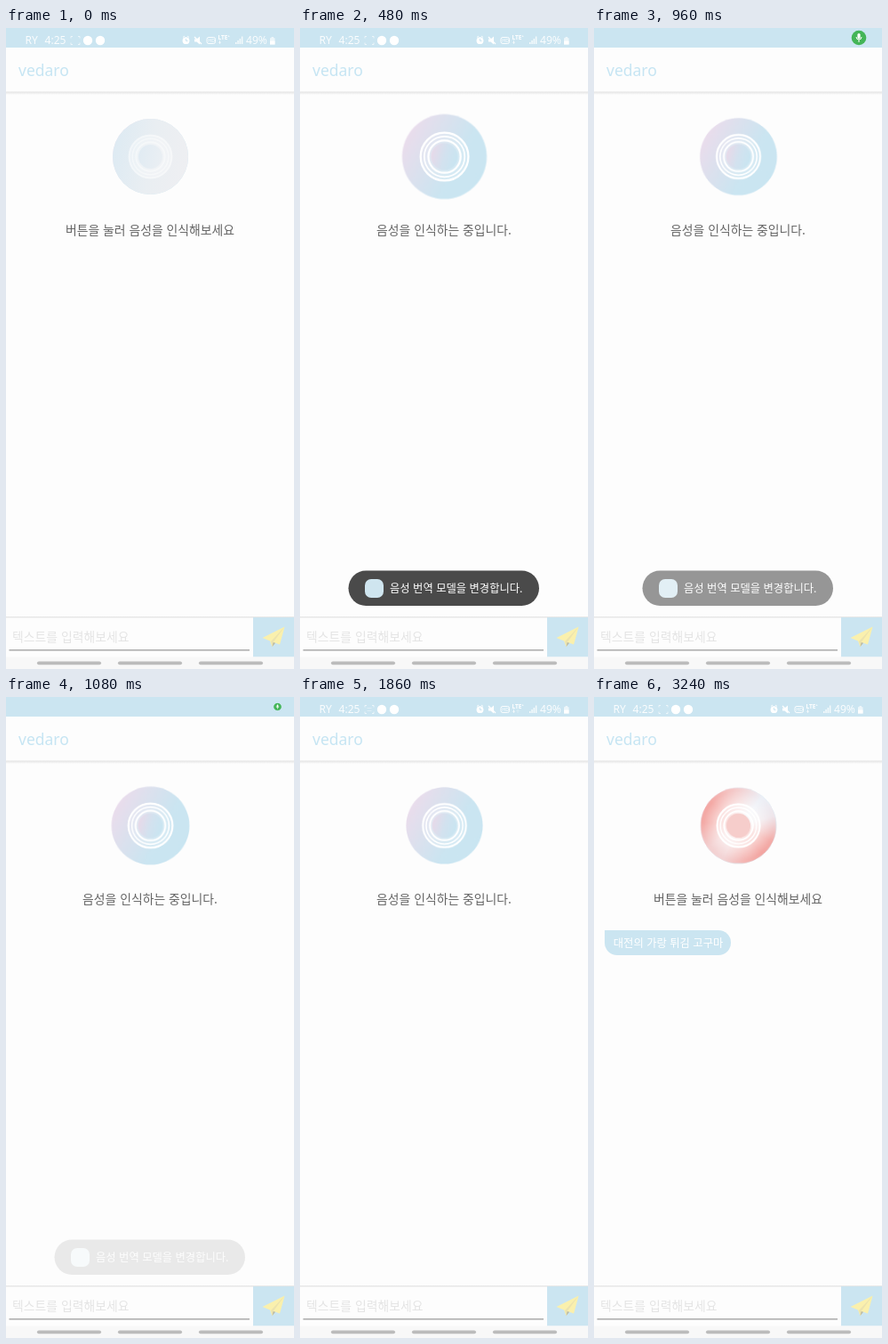
Recreate the animation shown at these times as an HTML page. Size 324x720 px, loop 3270 ms.

```html
<!DOCTYPE html>
<html lang="ko">
<head>
<meta charset="utf-8">
<title>Voice recognition</title>
<style>
  html, body { margin: 0; width: 100%; height: 100%; overflow: hidden; background: #fdfdfd; }
  body { position: relative; }
  svg { position: absolute; left: 0; top: 0; display: block; }
  text { font-family: "Noto Sans CJK KR", "Noto Sans CJK", "Noto Sans", sans-serif; }
  .latin { font-family: "Noto Sans", "Open Sans", sans-serif; }
  .prompt { font-size: 13.87px; fill: #646464; text-anchor: middle; }

  /* One shared 3270 ms clock */
  .anim, .disc, .disc .face { animation: 3270ms linear infinite; }

  .disc { position: absolute; left: 119.5px; top: 101.5px; width: 85px; height: 85px; animation-name: pulse; }
  .face { position: absolute; inset: 0; border-radius: 50%; filter: blur(.7px); }
  .face::before, .face::after { content: ""; position: absolute; border-radius: 50%; }
  .face::before { inset: 18px; background: rgba(255, 255, 255, var(--veil)); }
  .face::after { inset: 29px; background: var(--core); }
  .blue { background: linear-gradient(118deg, #eddcec 8%, #dbe1ee 36%, #cbe5f1 62%, #c9e6f2);
          --veil: .2; --core: linear-gradient(105deg, #ecd8e8, #d3e2ef 50%, #c6e6f2); }
  .pale { background: linear-gradient(100deg, #dceaf3, #e9eef2 50%, #efeff2);
          --veil: .3; --core: linear-gradient(100deg, #e0ebf3, #ebeff3); }
  .red  { background: radial-gradient(rgba(255, 255, 255, .5) 40%, transparent 66%),
            conic-gradient(#f4cfcf, #edf0f7 40deg, #efe6eb 75deg, #f3aca8 115deg, #f3a5a1 140deg,
            #f4b5b2 170deg, #f3d5d6 205deg, #f3d0d0 235deg, #f3aaa6 275deg, #f4a9a5 310deg, #f4cfcf);
          --veil: .35; --core: #f6cdcb; }
  .disc .blue { animation: none; }
  .disc .pale { animation-name: pale; animation-timing-function: step-end; }
  .disc .red { animation-name: red; }
  .disc svg { fill: none; stroke: #fff; }
  .rings { animation-name: rings; }

  .idle { animation-name: idle; animation-timing-function: step-end; }
  .busy { animation-name: busy; animation-timing-function: step-end; }
  .bubble { animation-name: bubble; animation-timing-function: step-end; }
  .toast { animation-name: toast; }
  .status { animation-name: status; }
  .chip { animation-name: chip; transform-box: view-box; transform-origin: 0 0; }
  .blink { animation-name: blink; }

  @keyframes pulse {
    0% { transform: scale(1); }
    6.4%, 10.1% { transform: scale(1.01); }
    13.8%, 15.6% { transform: scale(1.12); }
    18.3% { transform: scale(1.08); }
    22% { transform: scale(1.02); }
    25.7% { transform: scale(1.06); }
    29.4% { transform: scale(1.02); }
    33.9% { transform: scale(1.035); }
    39.4% { transform: scale(1.02); }
    45.9%, 54.1% { transform: scale(1.035); }
    58.7%, 100% { transform: scale(1); }
  }
  @keyframes pale { 0% { opacity: 1; } 6%, 100% { opacity: 0; } }
  @keyframes rings { 0%, .9% { opacity: .4; } 5.5%, 100% { opacity: 1; } }
  @keyframes red {
    0%, .9% { opacity: 0; } 5.5%, 9.2% { opacity: 1; }
    12.8%, 77% { opacity: 0; } 81.7%, 100% { opacity: 1; }
  }
  @keyframes idle { 0% { opacity: 1; } 10.1% { opacity: 0; } 58.7%, 100% { opacity: 1; } }
  @keyframes busy { 0% { opacity: 0; } 10.1% { opacity: 1; } 58.7%, 100% { opacity: 0; } }
  @keyframes bubble { 0% { opacity: 0; } 77.06%, 100% { opacity: 1; } }
  @keyframes toast {
    0%, 3.2% { opacity: 0; } 6.4% { opacity: .42; } 11%, 25.5% { opacity: 1; }
    29.4% { opacity: .57; } 33.9%, 100% { opacity: 0; }
  }
  @keyframes status { 0%, 18.3% { opacity: 1; } 21.1%, 34.9% { opacity: 0; } 39.4%, 100% { opacity: 1; } }
  @keyframes chip {
    0%, 20% { opacity: 0; transform: translate(298px, 11px) scale(.5); }
    22%, 31.5% { opacity: 1; transform: translate(298px, 11px) scale(1); }
    33.9%, 39.4% { opacity: 1; transform: translate(309.5px, 11px) scale(.25); }
    43%, 100% { opacity: 0; transform: translate(309.5px, 11px) scale(.25); }
  }
  @keyframes blink {
    0%, 40% { opacity: 0; } 44%, 54.1% { opacity: 1; }
    58.7%, 67.9% { opacity: 0; } 72.4%, 77.1% { opacity: 1; }
    81.7%, 86.2% { opacity: 0; } 90.8%, 95.4% { opacity: 1; }
    99%, 100% { opacity: 0; }
  }
</style>
</head>
<body>
<svg width="324" height="720" viewBox="0 0 324 720">
  <defs>
    <linearGradient id="shade" x2="0" y2="1">
      <stop stop-color="#e2e2e2"/><stop offset="1" stop-color="#fdfdfd"/>
    </linearGradient>
  </defs>
  <rect width="324" height="720" fill="#fdfdfd"/>
  <rect width="324" height="22" fill="#cbe5f1"/>
  <rect y="71.5" width="324" height="3.5" fill="url(#shade)"/>
  <text class="latin" x="14" y="54.3" font-size="17.5" fill="#c6e5f3">vedaro</text>

  <g class="anim status" fill="#fff">
    <g font-size="12.1" opacity=".9">
      <text class="latin" x="21.5" y="18">RY</text>
      <text class="latin" x="43.5" y="18">4:25</text>
      <text class="latin" x="270" y="18">49%</text>
    </g>
    <g fill="none" stroke="#fff" stroke-width=".9">
      <path d="M73 11.5v-2h2M81 9.5h2v2M83 16.5v2h-2M75 18.5h-2v-2" opacity=".7"/>
      <path class="anim blink" d="M75.5 12.5h5M75.5 15.5h5"/>
      <path d="M199 10.5l2-1.5M206 10.5l-2-1.5"/>
      <rect x="226" y="10.5" width="9.5" height="7" rx="2"/>
    </g>
    <circle cx="92" cy="14" r="5.2"/>
    <circle cx="106" cy="14" r="5.2"/>
    <circle cx="202.5" cy="14.2" r="3.9"/>
    <path d="M202.5 12v2.5h2" fill="none" stroke="#cbe5f1"/>
    <path d="M212 12.5h2.5l3.500-3v9l-3.500-3H212z"/>
    <path d="M212 10l8 8" stroke="#fff" stroke-width="1.2"/>
    <text class="latin" x="227.3" y="16.2" font-size="5.5">HD</text>
    <text class="latin" x="238.5" y="13" font-size="6.5" font-weight="700">LTE⁺</text>
    <path d="M240.5 14v3M239.5 16l1 1.5 1-1.5" stroke="#fff" stroke-width=".7" fill="none"/>
    <path class="anim blink" d="M245 18v-3.5M243.5 16l1.5-1.5 1.5 1.5" stroke="#fff" stroke-width=".8" fill="none"/>
    <path d="M258 16h1.5v2H258zM260.3 14h1.5v4h-1.5zM262.6 12h1.5v6h-1.5zM264.9 9.5h1.5V18h-1.5z" opacity=".8"/>
    <path d="M298.5 10h2.5v1.2h1.5V18.5h-5.5v-7.300h1.5z" opacity=".65"/>
    <path d="M297 14.5h5.5v4H297z"/>
  </g>

  <g class="anim chip">
    <circle r="8.3" fill="#43b557"/>
    <rect x="-1.6" y="-5" width="3.2" height="6" rx="1.6" fill="#fff"/>
    <path d="M-3-1a3 3 0 0 0 6 0M0 2v3" fill="none" stroke="#fff"/>
  </g>

  <text class="prompt anim idle" x="162" y="231.7">버튼을 눌러 음성을 인식해보세요</text>
  <text class="prompt anim busy" x="162" y="231.7">음성을 인식하는 중입니다.</text>

  <g class="anim bubble">
    <path d="M12 262H140a14 14 0 0 1 0 28H26a14 14 0 0 1-14-14z" fill="#cbe5f1"/>
    <text x="21.8" y="281" font-size="12.3" fill="#fff">대전의 가랑 튀김 고구마</text>
  </g>

  <g class="anim toast">
    <rect x="54.5" y="609.5" width="214.5" height="39.5" rx="19.7" fill="#4a4a4a"/>
    <rect x="73" y="619" width="21" height="21" rx="7" fill="#cfe5ef"/>
    <text x="101" y="633.7" font-size="12.3" fill="#fff">음성 번역 모델을 변경합니다.</text>
  </g>

  <rect y="661" width="324" height="2.500" fill="url(#shade)"/>
  <text x="7" y="689" font-size="13.87" fill="#e4e4e4">텍스트를 입력해보세요</text>
  <rect x="3.5" y="698.3" width="270.5" height="1.1" fill="#8c8c8c"/>
  <rect x="278" y="662" width="46" height="44.5" fill="#cbe5f1"/>
  <path d="M313.500 672.500L288.500 685l8.500 3.500 2.500 6.500 3-4.500 5.500 2z" fill="#faf0ad"/>
  <path d="M313.500 672.500l-15.500 16.500 1.500 6 1.200-5z" fill="#ece3ae"/>
  <path d="M299.500 695l1.200-5 2.300.8z" fill="#b9b9a4"/>
  <rect y="706.5" width="324" height="13.5" fill="#f8f8f8"/>
  <g fill="#bcbcbc">
    <rect x="35" y="711.5" width="72" height="3.7" rx="1.85"/>
    <rect x="126" y="711.5" width="72" height="3.7" rx="1.85"/>
    <rect x="217" y="711.5" width="72" height="3.7" rx="1.85"/>
  </g>
</svg>

<div class="disc">
  <div class="face blue"></div>
  <div class="face pale"></div>
  <div class="face red"></div>
  <svg class="anim rings" width="85" height="85" viewBox="-42.5 -42.5 85 85">
    <circle r="24" stroke-width="2"/>
    <circle r="20.3" stroke-width="1.5"/>
    <circle r="16.2" stroke-width="2"/>
  </svg>
</div>
</body>
</html>
```
